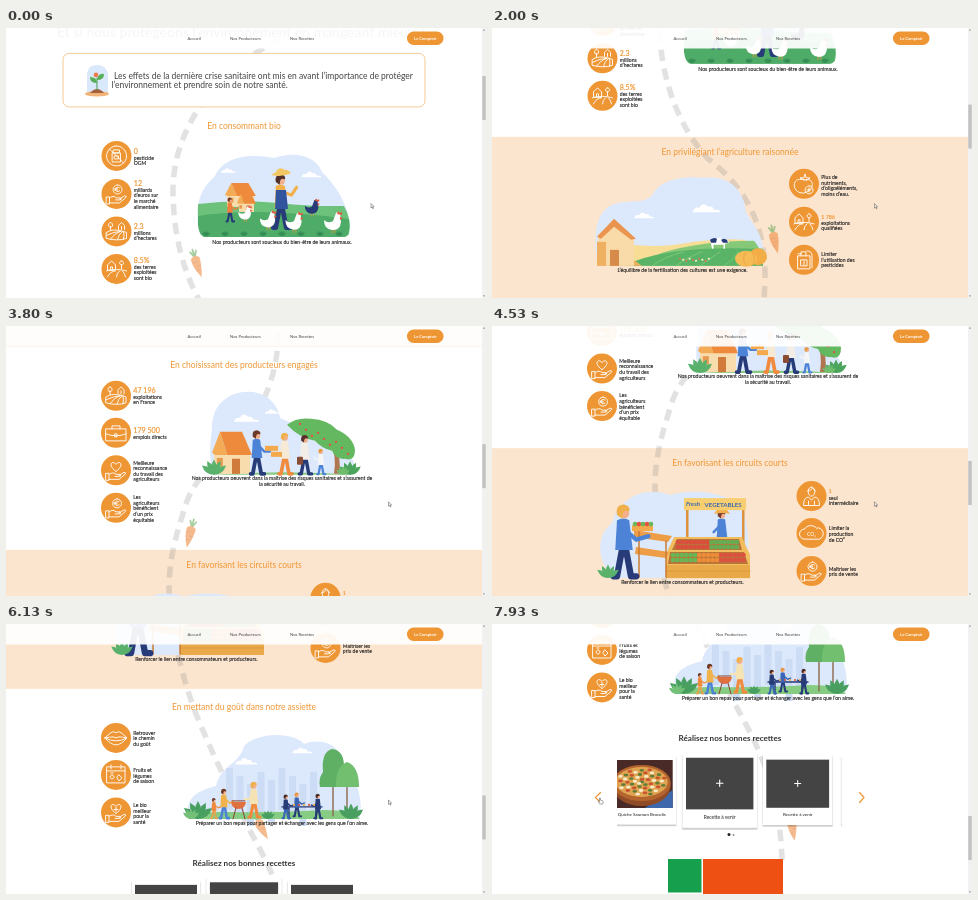
An HTML page that plays this animation: 480x270 px, repeating every 8 s.

```html
<!DOCTYPE html>
<html lang="fr">
<head>
<meta charset="utf-8">
<title>Manger mieux</title>
<style>
html, body { margin: 0; width: 100%; height: 100%; overflow: hidden; background: #fff; }
svg { display: block; width: 100vw; height: 100vh; }
text { font-family: Lato, "Open Sans", sans-serif; }
</style>
</head>
<body>
<svg id="stage" viewBox="0 0 480 270"></svg>
<script>
const ORANGE = '#ef9634', PEACH = '#fce5ce', SKY = '#dce8fb', INK = '#1c1c1c';
const NAVY = '#263b78', BLUE = '#4d83d6', SKIN = '#f3b08c', BROWN = '#6d3a2a', BLOND = '#f0b04c';

// Shape helpers
const path = (d, fill) => `<path d="${d}" fill="${fill}"/>`;
const line = (d, color, w = 1) =>
  `<path d="${d}" fill="none" stroke="${color}" stroke-width="${w}" stroke-linecap="round" stroke-linejoin="round"/>`;
const oval = (x, y, rx, ry, fill) => `<ellipse cx="${x}" cy="${y}" rx="${rx}" ry="${ry}" fill="${fill}"/>`;
const dot = (x, y, r, fill) => oval(x, y, r, r, fill);
const rect = (x, y, w, h, fill, rx = 0, alpha = 1) =>
  `<rect x="${x}" y="${y}" width="${w}" height="${h}" rx="${rx}" fill="${fill}" fill-opacity="${alpha}"/>`;
const text = (x, y, s, size, fill = INK, extra = '') =>
  `<text x="${x}" y="${y + size * .35}" font-size="${size}" fill="${fill}" ${extra}>${s}</text>`;
const group = (x, y, body, extra = '') => `<g transform="translate(${x} ${y}) ${extra}">${body}</g>`;
const repeat = (n, f) => Array.from({ length: n }, (_, i) => f(i)).join('');
const MID = 'text-anchor="middle"';
const heavy = (color, w = .1) => `stroke="${color}" stroke-width="${w}"`;

const heading = (y, s) => text(238, y, s, 8.5, ORANGE, MID);
const caption = (x, y, s) => text(x, y, s, 5.15, INK, `${MID} ${heavy(INK)}`);

// White line icons centred on 0,0
const HAND = 'M-10 3h3v7h-3zM-7 4q4-3 7 0h4q2 2-1 2h-4M3 5l5-3q3 0 1 2l-6 5h-10';
const ICONS = {
  jar: 'M-4-3h8v9h-8zM-3-6h6v3h-6zM-7-7L7 7M0-10a10 10 0 1 0 .1 0M-2 0h4v3h-4z',
  euro: HAND + 'M1-9a4.5 4.5 0 1 0 .1 0M3-6q-3-2-4 1q0 4 4 2M-2-5h3M-2-4h3',
  field: 'M-10 1q7-5 20 0v6q-9 3-20 0zM-10 4q8-4 14-4M-6 8q4-6 10-8M1 8q1-5 5-8M7 8q1-4 0-8M-6-1v-4M-6-9a2 2.500 0 1 0 .1 0M5-2v-3M2-2v-4l3-3 3 3v4',
  barn: 'M-9 1v-5l4-4 4 4v5zM-6 1v-3h2v3M-10 2q10-3 20 0M-9 8q3-6 8-6M0 8q0-4 3-6M9 8q-1-4-3-6M5-8a2 2 0 1 0 .1 0M5 0v-4',
  tomato: 'M0-4c-13-4-12 12-3 13q3 1 6-1c7-3 8-15-3-12M0-4l-4-2 4 0 1-4 1 4 4 0-4 3M5 2a4 4 0 1 0 .1 0M5 4v4M3 6h4',
  can: 'M-6-4h12v13h-12zM-3-4v-4h5v4M-3-6h-3M-3 0h6v6h-6zM0 1v4M8 8v-12q0-5-5-5',
  bag: 'M-10-4h20v12h-20zM-4-4v-3h8v3M-10 1q10 4 20 0M-1 1h2v3h-2z',
  heart: HAND + 'M0 1c-9-6-4-12 0-7c4-5 9 1 0 7',
  person: 'M0-9c-5 0-4 9 0 9s5-9 0-9M-4-5q4-1 5-3l3 3M-8 9q0-8 5-8l3 3 3-3q5 0 5 8zM-3 9v-4M3 9v-4',
  cloud: 'M-7 6a5 5 0 0 1 0-10a7 6 0 0 1 12-1a5 5.500 0 0 1 3 11z',
  lips: 'M-11 0q7-7 9-6l2 1 2-1q2-1 9 6q-6 7-11 7t-11-7M-11 0q5-1 8-1l3 1 3-1q3 0 8 1q-6 3-11 3t-11-3',
  calendar: 'M-9-8h18v16h-18zM-9-4h18M-5-10v4M5-10v4M-4 0a2 2 0 1 0 .1 0M3 0l3 3-3 3-2-3zM-5-2h2',
  health: HAND + 'M0 1c-9-6-4-12 0-7c4-5 9 1 0 7M0-5v4M-2-3h4'
};
const icon = (x, y, name) => group(x, y, dot(0, 0, 15, ORANGE) + line(ICONS[name], '#fff', .9) +
  (name === 'cloud' ? text(0, 1, 'CO₂', 5, '#fff', MID) : ''));

// Icon with an optional orange figure and lines of text
function item(x, y, name, ty, lines, num, size = 7.1) {
  const tx = x + 17.3, first = num ? ty + 6.2 : ty;
  return icon(x, y, name) + (num ? text(tx, ty, num, size, ORANGE, heavy(ORANGE, .18)) : '') +
    lines.map((s, i) => text(tx, first + i * 5.6, s, 5.1, INK, heavy(INK))).join('');
}

// Figures standing on y = 0, about 40 high
const person = (x, y, k, shirt, legs, hair, arm = 'M0-29l8 7 5-2') => group(x, y,
  line('M-1-17l-3 16h-2M1-17l3 16h3', legs, 3.6) +
  path('M-4-33q4-2 7 0l2 17h-10z', shirt) + line(arm, shirt, 2.4) +
  dot(0, -37, 3, SKIN) + path('M-4-36q-1-6 4-6q4 1 3 4q-4-2-4 4z', hair), `scale(${k})`);
const hen = (x, y, k, color = '#fff') => group(x, y,
  line('M-1 5v4M2 5v4', '#e79a3b', .8) +
  path('M-9-4q4 4 9 1l3-8q3-2 4 1l1 8q-1 9-9 8q-8-1-8-10', color) +
  path('M4-10l1-3 2 2 2-1v3zM7-7l3 1-3 2z', '#e4573f'), `scale(${k})`);
const cloud = (x, y, k) => group(x, y, path('M-12 3q1-5 6-4q3-6 8-1q5-1 5 3q5-1 6 2z', '#fff'), `scale(${k})`);
const bush = (x, y, k, c) => group(x, y,
  repeat(5, i => `<path d="M0 0q-6-8 0-17q6 9 0 17" fill="${c}" transform="rotate(${i * 26 - 52})"/>`), `scale(${k})`);
const house = (x, y, w, h) =>
  rect(x + 2, y + h * .45, w - 4, h * .55, '#f8dcae') +
  path(`M${x + w * .2} ${y}h${w * .55}l${w * .25} ${h * .55}h${-w * .62}z`, '#ee8a3c') +
  path(`M${x} ${y + h * .5}l${w * .2} ${-h * .5} ${w * .18} ${h * .55}h${-w * .3}z`, '#f3ab55') +
  rect(x + w * .5, y + h * .64, w * .2, h * .36, '#d07a3c') +
  rect(x + w * .12, y + h * .62, w * .15, h * .2, '#e79a4f');

const intro =
  text(51, 4, 'Et si nous protégeons l’environnement en mangeant mieux ?', 14, '#777') +
  '<rect x="57" y="25.500" width="362" height="53.500" rx="6" fill="#fff" stroke="#f2bd7c" stroke-width=".8"/>' +
  path('M81 66V46q1-9 10-9t11 9v20z', '#d9e8fa') + oval(91, 66, 12, 2.6, '#f1b377') +
  path('M84 65q7-8 14 0z', '#a5613c') + line('M91 62V50', '#4a9b51', 1) +
  path('M91 55q-7 0-7-6q7 0 7 6M91 52q1-7 7-6q0 6-7 6', '#58ad58') + dot(90, 47, 2.3, '#ef7a4a') +
  text(108, 48, 'Les effets de la dernière crise sanitaire ont mis en avant l’importance de protéger', 8.5, '#444') +
  text(105.5, 57.5, 'l’environnement et prendre soin de notre santé.', 8.5, '#444');

const farmyard =
  path('M193 198C188 172 198 158 209 148C219 126 248 126 268 130C288 124 308 126 316 144C326 154 338 168 343 190V200z', SKY) +
  cloud(305, 147, .8) + cloud(222, 143, .6) +
  path('M192 176q40-5 80-1t66 3q8 14 5 28q-2 3-6 3H199q-8-1-7-33z', '#6cc27a') +
  path('M192 188q60-9 151 3q2 18-6 18H199q-8-1-7-21z', '#4fab68') +
  house(219, 155, 31, 24) + house(231, 166, 19, 18) +
  person(224, 194, .58, '#ee7f3c', NAVY, BROWN) +
  person(275, 201, 1.3, '#f2b04a', NAVY, '#503028', 'M0-29l8 3 4-6') +
  path('M270 162h10l2 19h-13z', '#31549f') + path('M265 147q11 3 20-2q-4-4-6-3q-6-4-9 2z', '#f3c863') +
  hen(239, 187, .75) + hen(262, 194, .9) + hen(288, 196, .95) + hen(327, 196, 1) + hen(306, 181, .8, NAVY) +
  repeat(8, i => bush(200 + i * 19, 208, .3, '#358d55'));

const hills =
  path('M106 238C100 205 104 178 128 175C142 172 150 176 160 168C168 150 195 148 212 150C235 147 252 160 254 185C264 200 276 215 270 238z', SKY) +
  cloud(214, 181, 1.1) + cloud(152, 188, .8) +
  path('M106 212q50 10 84 4t62-4q18 8 19 26H106z', '#f8dd96') +
  path('M170 225q40-12 92-12q9 10 9 25H140z', '#84c878') +
  path('M132 238q40-21 139-17v17z', '#5ab467') +
  repeat(4, i => line(`M${160 + i * 24} 238q14-10 ${32 - i * 6}-14`, '#7cc877', 1)) +
  path('M106 224q20-4 44 14H106z', '#eeb25c') +
  path('M106 207l16-14 20 17v28h-36z', '#f8dba9') + path('M105 209l17-18 22 20-5 1-17-13-13 12z', '#ea9450') +
  rect(118, 222, 9, 16, '#d68b4a') + rect(105, 214, 9, 24, '#f0b062') +
  path('M218 212q8-4 14 0l3-1 2 4-4 1v5h-1.500v-4h-10v4H220z', '#fff') +
  path('M218 212q4-3 7-1l-1 4h-5zM229 212l3-1 3 1 1 3-5 0z', NAVY) +
  repeat(10, i => dot(188 + i * 3.2, 231 + i % 3, 1, i % 2 ? '#fff3d8' : '#e4704a')) +
  oval(266, 229, 9, 8.500, '#f2ae45') + oval(254, 231, 11, 8, '#f6bb55') +
  line('M254 224q-5 7 0 14M260 224q5 7 0 14', '#e39b39', .6);

const orchard =
  path('M206 148C202 118 206 112 206 100C207 76 226 65 244 66C262 67 272 80 274 92C284 98 322 106 336 124Q350 132 350 148z', SKY) +
  cloud(240, 93, 1) + cloud(266, 86, .6) +
  path('M204 149q70-5 148 0z', '#8acb82') +
  house(206, 106, 40, 42) +
  path('M328 148q3-18-4-32l3-1 4 10 5-7 2 1-5 10q1 11 1 19z', '#b07652') +
  path('M281 99q10-8 24-6q17 1 26 11q16 7 18 20q0 12-10 9q-9 1-13-8q-10-2-17-10q-16-3-28-16z', '#64b85f') +
  repeat(9, i => dot(294 + i * 6, 98 + i * 3 + i % 3 * 3, 1.2, '#e5533d')) +
  person(251, 149, 1.06, BLUE, NAVY, BROWN, 'M0-29l7 7 5 0') + rect(259, 120, 13, 5, '#f4a94c') +
  person(279, 149, 1, '#f6ead6', '#ef8a3e', BLOND, 'M0-29l-5 7-6 0') + rect(265, 126, 11, 5, '#f4a94c') +
  person(299, 149, .95, '#f2ede6', NAVY, '#5a2f2a', 'M0-29l-4 10 0 5') + rect(291, 131, 6, 8, '#8b4c35', 1) +
  person(315, 149, .62, '#f5f5f5', BLUE, '#e59a42', 'M0-29l-7 5-4-4') +
  bush(344, 149, .8, '#4ba45c') + bush(337, 149, .5, '#6fbd6c') + bush(208, 149, .9, '#5ab16b');

const market =
  path('M122 177C104 160 104 134 120 122C126 98 152 84 178 94C202 86 244 92 252 112C260 140 256 164 250 177z', SKY) +
  rect(194, 98, 2.5, 50, '#d9913f') + rect(250, 98, 2.500, 60, '#d9913f') +
  person(230, 153, 1.05, BLUE, NAVY, '#7a402d', 'M0-29l-8 8') + path('M222 113q8-2 16 0q-3-4-4-6q-4-2-8 0z', BLOND) +
  rect(192, 97, 62, 12, '#f7cf70') +
  text(194, 102.5, 'Fresh', 6.2, '#3b66b5', 'font-style="italic" font-weight="700"') +
  text(212.500, 104, 'VEGETABLES', 6.1, '#3b66b5', 'font-weight="700"') +
  path('M182 136h68l8 18v23h-84v-24z', '#f2bd5e') +
  path('M185 138h62l3 11h-70zM178 151h74l4 12h-80z', '#b87539') +
  repeat(30, i => dot(186 + i % 15 * 4.2, 141 + (i / 15 | 0) * 5, 2.4, i % 15 < 8 ? '#d94f3c' : '#65ad52')) +
  repeat(34, i => dot(181 + i % 17 * 4.400, 154 + (i / 17 | 0) * 5, 2.4, i % 17 < 6 ? '#68b556' : i % 17 < 11 ? '#ee8c38' : '#dc5140')) +
  rect(174, 164, 84, 13, '#eaa949') + line('M174 170h84', '#d48d36', .6) +
  path('M142 129l38 6-4 6-34-5zM144 146l33 5-3 6-31-4z', '#ed9d45') + line('M147 130v46M174 140v36', '#c77b35', 1.5) +
  person(132, 177, 1.75, BLUE, NAVY, BLOND, 'M0-28l7 6 7-2') +
  rect(140, 124, 21, 6, '#f4a94c') + repeat(5, i => dot(143 + i * 4, 123, 2.3, i % 2 ? '#e5533d' : '#6ab759')) +
  bush(116, 177, .8, '#5ab16b');

const picnic =
  path('M184 194C176 172 196 166 210 162C214 142 234 140 238 122C256 106 290 110 298 120C322 112 336 126 338 142C352 154 358 180 353 195z', SKY) +
  repeat(9, i => rect(220 + i * 10.500, 144 + i * 7 % 5 * 4, 7, 42, '#cddcf5')) +
  cloud(240, 138, .9) + cloud(296, 127, .8) +
  path('M182 195q8-8 44-7t92-2q28 0 36 9z', '#86cc83') +
  line('M327 192v-36M341 192v-32', '#8c6a4d', 1.4) +
  path('M314 163q-2-8 3-15q-2-20 9-23q13 1 12 21q5 8 3 17z', '#5fb065') +
  path('M330 163q-1-20 11-25q12 4 12 25z', '#72bf70') +
  person(208, 195, .5, '#ef8a3e', '#e9a24d', BROWN) +
  person(218, 195, .72, '#f1b24b', BLUE, BROWN) +
  person(248, 194, .86, '#f6e3b4', '#ef8a3e', BLOND, 'M0-29l-6 7-5 0') +
  path('M225 178h15q-1 7-7.500 7t-7.500-7', '#e0713f') + line('M230 184l-3 11M236 184l3 11M226 177h13', '#8a4030', 1) +
  line('M276 183h40M283 184v11M310 184v11', NAVY, 1.4) +
  person(280, 195, .58, NAVY, '#3b66b5', '#4c2b26') + person(291, 193, .58, '#3b66b5', NAVY, '#e5963f') +
  person(312, 195, .6, NAVY, NAVY, '#4c2b26', 'M0-29l-6 8-5-2') +
  repeat(5, i => dot(288 + i * 5, 181, 1.1, i % 2 ? '#e5533d' : BLOND)) +
  bush(192, 195, 1.05, '#489f60') + bush(185, 195, .6, '#75c079') + bush(262, 195, .5, '#489f60') + bush(345, 195, .9, '#489f60');

const trail = '<path id="trail" d="M275 12C225 32 166 90 167 165C168 230 190 275 215 303C250 330 274 365 273 424' +
  'C272 470 262 490 250 515C225 555 195 565 181 600C168 640 163 660 163 690C163 740 170 785 190 838' +
  'C205 875 220 905 243 953C260 985 288 1030 290 1110" fill="none" stroke="#777" stroke-opacity=".21" ' +
  'stroke-width="5.500" stroke-dasharray="11.500 7.500"/>';

const carrot = '<g id="carrot" opacity=".55">' +
  line('M0-7l-3-6M0-7v-8M0-7l3-6', '#5da552', 1.8) +
  path('M-4.500-6q4.500-4 9 0q0 9-4 20q-6-12-5-20z', '#ee8433') +
  line('M-3-2h3M0 2h3M-2 6h2', '#c9662a', .6) + '</g>';

// Recipe card drawn around x = 0 in page coordinates
function card(id, quiche) {
  const picture = quiche
    ? rect(-31, 1009, 62, 48, '#4a2a26') + path('M3 1057l28-18v18z', '#3f68ac') +
      oval(0, 1035, 29, 20, '#8f4c26') + oval(0, 1032, 29, 18, '#b4652d') + oval(0, 1031, 26, 15, '#dfa352') +
      repeat(48, i => {
        const a = i * 2.4, r = Math.sqrt(i / 48);
        return oval((Math.cos(a) * r * 24).toFixed(1), (1031 + Math.sin(a) * r * 13.5).toFixed(1), 2.3, 1.4,
          ['#5f7d35', '#f8ecc8', '#c9532f'][i % 3]);
      })
    : rect(-31, 1009, 62, 47.500, '#444') + line('M-3 1032.500h6M0 1029.500v6', '#fff', 1);
  return `<g id="${id}">` + rect(-35, 1005.500, 70, 70, '#000', 1, .08) + rect(-34.500, 1006, 69, 69, '#000', 1, .12) +
    rect(-34.300, 1005, 68.600, 68.500, '#fff') + picture +
    text(0, 1063.500, quiche ? 'Quiche Saumon Brocolis' : 'Recette à venir', 4.5, INK, MID) + '</g>';
}

const carousel =
  text(238, 987, 'Réalisez nos bonnes recettes', 8.1, '#333', `${MID} font-weight="700"`) +
  '<g clip-path="url(#window)">' + card('c0', true) + card('c3') + card('c2') + card('c1') + '</g>' +
  line('M108.500 1041.500l-5 5 5 5M367.500 1041.500l4.500 5-4.500 5', ORANGE, 1.2) +
  dot(237, 1083.500, 1.500, '#222') + dot(241.500, 1084, .9, '#888') +
  rect(176, 1108, 33.500, 33.500, '#16a04d') + rect(211, 1108, 80, 40, '#ee4f13');

const page = rect(0, 282, 476, 164, PEACH) + rect(0, 649, 476, 164, PEACH) + trail + carrot + intro +
  heading(98, 'En consommant bio') + farmyard +
  caption(276, 214, 'Nos producteurs sont soucieux du bien-être de leurs animaux.') +
  item(110.500, 128, 'jar', 124, ['pesticide', 'OGM'], '0') +
  item(110.500, 166, 'euro', 156, ['milliards', 'd’euros sur', 'le marché', 'alimentaire'], '12') +
  item(110.500, 203.500, 'field', 199, ['millions', 'd’hectares'], '2.3') +
  item(110.500, 241, 'barn', 233, ['des terres', 'exploitées', 'sont bio'], '8.5%') +
  group(0, 173, heading(124, 'En privilégiant l’agriculture raisonnée') + hills +
    caption(190.500, 242.500, 'L’équilibre de la fertilisation des cultures est une exigence.') +
    item(312, 156, 'tomato', 149.500, ['Plus de', 'nutriments,', 'd’oligoéléments,', 'moins d’eau.']) +
    item(312, 194, 'barn', 189, ['exploitations', 'qualifiées'], '1 786', 5.3) +
    item(312, 232, 'can', 226.500, ['Limiter', 'l’utilisation des', 'pesticides'])) +
  group(0, 425, heading(39, 'En choisissant des producteurs engagés') + orchard +
    caption(276, 152.500, 'Nos producteurs oeuvrent dans la maîtrise des risques sanitaires et s’assurent de') +
    caption(276, 158, 'la sécurité au travail.') +
    item(110, 70, 'field', 65, ['exploitations', 'en France'], '47 196') +
    item(110, 107, 'bag', 105, ['emplois directs'], '179 500') +
    item(110, 144.500, 'heart', 137, ['Meilleure', 'reconnaissance', 'du travail des', 'agriculteurs']) +
    item(110, 182, 'euro', 171.500, ['Les', 'agriculteurs', 'bénéficient', 'd’un prix', 'équitable'])) +
  group(0, 602, heading(62, 'En favorisant les circuits courts') + market +
    caption(190.500, 181, 'Renforcer le lien entre consommateurs et producteurs.') +
    item(319.500, 95, 'person', 90.500, ['seul', 'intermédiaire'], '1', 5.1) +
    item(319.500, 132, 'cloud', 127.500, ['Limiter la', 'production', 'de CO²']) +
    item(319.500, 170, 'euro', 168, ['Maîtriser les', 'prix de vente'])) +
  group(0, 748, heading(83.500, 'En mettant du goût dans notre assiette') + picnic +
    caption(276, 199.500, 'Préparer un bon repas pour partager et échanger avec les gens que l’on aime.') +
    item(110, 114, 'lips', 109, ['Retrouver', 'le chemin', 'du goût']) +
    item(110, 151, 'calendar', 146.500, ['Fruits et', 'légumes', 'de saison']) +
    item(110, 188.500, 'health', 181.500, ['Le bio', 'meilleur', 'pour la', 'santé'])) +
  carousel;

const chrome = rect(0, 0, 476, 20.500, '#fff', 0, .93) +
  text(181.500, 10.500, 'Accueil', 4.2, '#444') + text(224, 10.500, 'Nos Producteurs', 4.2, '#444') +
  text(284, 10.500, 'Nos Recettes', 4.2, '#444') + rect(401, 3.500, 36.500, 13.500, ORANGE, 6.7) +
  text(419.300, 10.300, 'Le Comptoir', 4.1, '#fff', `${MID} font-weight="700"`) +
  rect(476, 0, 4, 270, '#f1f1f1') + '<g id="thumb">' + rect(476.300, 0, 3.400, 44, '#c1c1c1') + '</g>' +
  path('M477 2.500l1-1.300 1 1.300zM477 267.500l1 1.300 1-1.300z', '#666');

const pointers =
  '<path id="arrow" d="M0 0v4.400l1-.9.8 1.700.7-.3-.8-1.700h1.400z" fill="#fff" stroke="#222" stroke-width=".4"/>' +
  '<path id="hand" d="M-.5 0q.7-.6 1 .2v2l2.200.6q.7.300.5 1.200l-.6 2h-2.800l-1.700-2.400q.2-.8 1.400.1z" fill="#fff" stroke="#222" stroke-width=".4"/>';

document.getElementById('stage').innerHTML =
  '<defs><clipPath id="window"><rect x="125" y="1000" width="225" height="80"/></clipPath></defs>' +
  rect(0, 0, 480, 270, '#fff') + `<g id="page">${page}</g>` + chrome + pointers;

const el = id => document.getElementById(id);
const move = (id, x, y, extra = '') => el(id).setAttribute('transform', `translate(${x} ${y}) ${extra}`);

// Linear interpolation over [time, value] pairs
function track(keys, t) {
  let i = 1;
  while (i < keys.length - 1 && t > keys[i][0]) i++;
  const [t0, a] = keys[i - 1], [t1, b] = keys[i];
  return a + (b - a) * Math.min(1, Math.max(0, (t - t0) / (t1 - t0)));
}
const SCROLL = [[0, 0], [2000, 173], [2670, 279], [3800, 425], [5070, 602], [6130, 748], [6330, 772], [6430, 772], [7050, 873]];
const CARROT_Y = [[0, 236], [2000, 212], [2670, 218], [3800, 208], [5070, 203]];
const POINTER_X = [[0, 365], [900, 365], [1500, 382.500], [6700, 382.500], [7270, 129], [7600, 108]];
const POINTER_Y = [[0, 175.500], [7270, 176], [7600, 174]];

function pointAtHeight(y) {
  const t = el('trail');
  let lo = 0, hi = t.getTotalLength();
  for (let i = 0; i < 18; i++) {
    const m = (lo + hi) / 2;
    if (t.getPointAtLength(m).y < y) lo = m; else hi = m;
  }
  const a = t.getPointAtLength(lo - 4), b = t.getPointAtLength(lo + 4);
  return { x: (a.x + b.x) / 2, turn: -Math.atan2(b.x - a.x, b.y - a.y) * 180 / Math.PI };
}

function draw(t) {
  const s = track(SCROLL, t);
  move('page', 0, -s);
  move('thumb', 0, 48 + s * .165);

  const cy = s + track(CARROT_Y, t), spot = pointAtHeight(cy);
  move('carrot', spot.x + 13, cy, `rotate(${spot.turn})`);

  const u = Math.min(1, Math.max(0, (t - 7740) / 300)), p = 1 - (1 - u) ** 2;
  [0, p, 1 - p, 0].forEach((w, i) => {
    const k = 1 + .1 * w;
    move('c' + i, 238 + 78 * (i - 2 + p), 1035 * (1 - k), `scale(${k})`);
  });

  const x = track(POINTER_X, t), y = track(POINTER_Y, t), over = x < 111;
  move('arrow', x, y);
  move('hand', x, y);
  el('arrow').setAttribute('visibility', over ? 'hidden' : 'visible');
  el('hand').setAttribute('visibility', over ? 'visible' : 'hidden');
}

const start = performance.now();
function tick() {
  draw((performance.now() - start) % 8000);
  requestAnimationFrame(tick);
}
tick();
</script>
</body>
</html>
```
